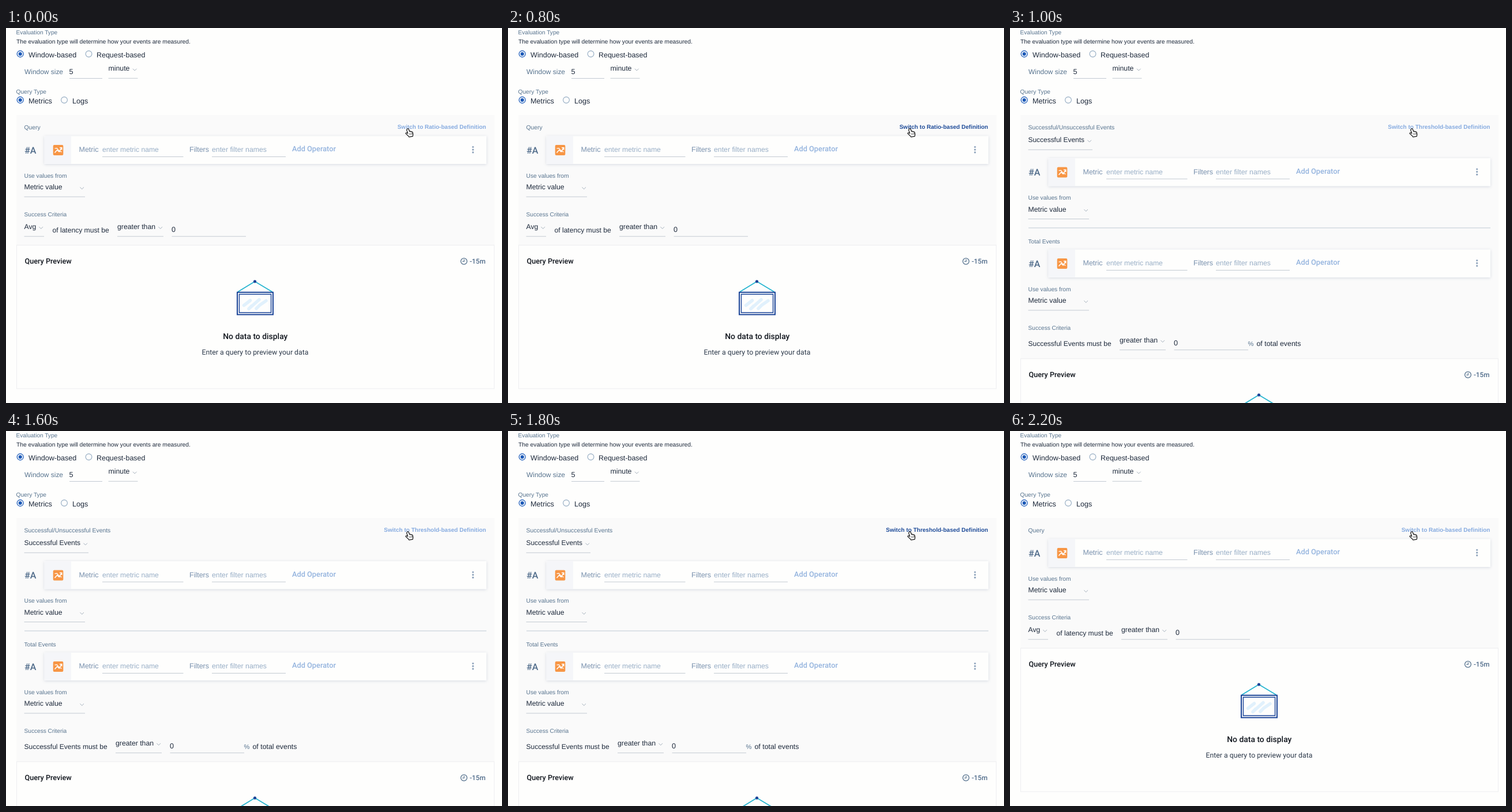
An HTML page for the animation above (2400 ms loop, 860 by 651 pixels).

```html
<!DOCTYPE html>
<html lang="en">
<head>
<meta charset="utf-8">
<style>
html, body { margin: 0; width: 100%; height: 100%; overflow: hidden; background: #fefefd; }
svg { display: block; width: 860px; height: 651px; }
text { font-family: "Liberation Sans", Arial, sans-serif; fill: #1e2a3c; text-rendering: geometricPrecision; white-space: pre; }
.label { fill: #58748f; }
.hint { fill: #98aec6; }
.field { fill: #7890ad; }
.bold { font-family: Roboto, sans-serif; font-weight: 500; }
.plain { font-family: Roboto, sans-serif; fill: #2c394a; }
.black { fill: #10151d; }
.slate { fill: #4f6b8a; }
.add { fill: #93b3de; }
.link { font-weight: bold; text-anchor: end; }
.mid { text-anchor: middle; }
.end { text-anchor: end; }
.card { fill: #fefefd; filter: drop-shadow(0 1px 2.5px rgba(70, 90, 130, .2)); }
.line { fill: none; stroke: #c3cad2; }
.chev { fill: none; stroke: #a3afbb; }
</style>
</head>
<body>
<svg id="stage" viewBox="0 0 860 651"></svg>
<script>
const LOOP = 2400;
const LIGHT = '#86abe0', DARK = '#1f4c99';

const text = (x, y, size, str, cls = '') =>
  `<text x="${x}" y="${y}" font-size="${size}" class="${cls}">${str}</text>`;
const rect = (x, y, w, h, attrs) =>
  `<rect x="${x}" y="${y}" width="${w}" height="${h}" ${attrs}/>`;
const path = (d, attrs) => `<path d="${d}" ${attrs}/>`;
const circle = (x, y, r, attrs) => `<circle cx="${x}" cy="${y}" r="${r}" ${attrs}/>`;
const rule = (x1, x2, y) => path(`M${x1} ${y}H${x2}`, 'class="line"');
const chevron = (x, y) => path(`M${x - 3.3} ${y - 1.6}l3.3 3.3 3.3-3.3`, 'class="chev"');
const shift = (dy, body) => `<g transform="translate(0 ${dy})">${body}</g>`;

const radio = (x, y, on) => on
  ? circle(x, y, 5.5, 'fill="#fefefd" stroke="#2461bd" stroke-width="1.3"') + circle(x, y, 3.1, 'fill="#1d5ab8"')
  : circle(x, y, 5.4, 'fill="#fefefd" stroke="#91a9c0" stroke-width="1.1"');

const select = (x, y, size, str, right) =>
  text(x, y, size, str) + chevron(right - 5.3, y - 2) + rule(x, right, y + 13);

const header =
  text(17.5, 10.7, 10.1, 'Evaluation Type', 'label') +
  text(18, 26.5, 10.27, 'The evaluation type will determine how your events are measured.') +
  radio(24.7, 45, true) + text(39, 51, 12.6, 'Window-based') +
  radio(143.5, 45) + text(157, 51, 12.45, 'Request-based') +
  text(32, 80, 11.95, 'Window size', 'label') +
  text(109.5, 79.7, 12.6, '5') + rule(110, 167, 87.5) +
  select(177.5, 74.3, 12.3, 'minute', 228.5) +
  text(17.5, 114, 10.2, 'Query Type', 'label') +
  radio(24.7, 125, true) + text(39, 131.3, 12.7, 'Metrics') +
  radio(101, 125) + text(115, 131.3, 12.6, 'Logs');

const queryRow =
  text(32, 217.5, 16, '#A', 'bold slate') +
  rect(66.5, 187.5, 766.5, 48.5, 'class="card"') +
  rect(67, 188, 46, 47.5, 'fill="#f5f6f9"') +
  rect(81.7, 203, 17.6, 18, 'rx="2" fill="#f79645"') +
  path('M84.5 216.5l4.2-4.7 3.4 3 4.4-6.8M93 207.7h3.7v3.7', 'fill="none" stroke="#fff" stroke-width="1.6"') +
  path('M84.5 209.2l3.8-.6 4 5 4.2 1.6', 'fill="none" stroke="#fff" stroke-width="1.3"') +
  text(126.5, 215, 12.5, 'Metric', 'field') +
  text(167, 215, 12.15, 'enter metric name', 'hint') + rule(167, 307.5, 223.5) +
  text(318, 215, 12.5, 'Filters', 'field') +
  text(357, 215, 12.3, 'enter filter names', 'hint') + rule(357, 485, 223.5) +
  text(496, 214, 12.75, 'Add Operator', 'bold add') +
  [206.5, 211.2, 215.9].map(y => circle(809.7, y, 1.6, 'fill="#8ea3bb"')).join('') +
  text(31.5, 259.8, 10.25, 'Use values from', 'label') +
  select(31.5, 280, 12.25, 'Metric value', 137);

const criteria = (x, lead) =>
  text(31.5, 326.8, 10.15, 'Success Criteria', 'label') + lead +
  select(x, 348.8, 12.25, 'greater than', x + 80) +
  text(x + 94, 354.2, 12.6, '0') + rule(x + 94.5, x + 223, 361.8);

const preview =
  rect(18.5, 377, 828, 249, 'fill="#fefefd" stroke="#edeef0"') +
  text(32.5, 409.3, 12.65, 'Query Preview', 'bold black') +
  circle(794, 405, 5.4, 'fill="none" stroke="#58748f" stroke-width="1.3"') +
  path('M794.3 401.5v4h-3', 'fill="none" stroke="#58748f" stroke-width="1.2"') +
  text(831.5, 408.7, 11.8, '-15m', 'bold slate end') +
  path('M402 458l29.5-18 30 18', 'fill="none" stroke="#27b5d0" stroke-width="1.8"') +
  circle(431.5, 440, 2.6, 'fill="#1c4598"') +
  rect(401, 458.8, 62, 38.7, 'fill="#fefefd" stroke="#1c4598" stroke-width="2"') +
  rect(404.4, 462.2, 55.2, 31.9, 'fill="#fefefd" stroke="#1c4598" stroke-width="1.5"') +
  path('M412.5 481.5l11-8.5M421 487.5l5-5M421 487.5l18-16M434 487l6-6M440 481l11-7.5', 'fill="none" stroke="#e1f1fc" stroke-width="5.5" stroke-linecap="round"') +
  text(432.3, 540.3, 13.9, 'No data to display', 'bold black mid') +
  text(432, 566.7, 12.3, 'Enter a query to preview your data', 'plain mid');

const panel = height => rect(18, 151, 829, height, 'fill="#fafafa"');
const link = (id, str) => `<g id="${id}">${text(832.5, 175.2, 10.04, str, 'link')}</g>`;

const threshold = panel(226) +
  text(31.5, 176, 10.3, 'Query', 'label') +
  link('toRatio', 'Switch to Ratio-based Definition') +
  queryRow +
  criteria(193, select(31.5, 348.8, 12.2, 'Avg', 66) + text(80.5, 355, 12.1, 'of latency must be')) +
  preview;

const ratio = panel(423) +
  text(31.5, 176, 10.42, 'Successful/Unsuccessful Events', 'label') +
  link('toThreshold', 'Switch to Threshold-based Definition') +
  select(31.5, 198.3, 11.95, 'Successful Events', 143) +
  shift(38.5, queryRow) +
  path('M32 347H833', 'stroke="#bfcbd6" stroke-width="1.2"') +
  text(31.5, 373.5, 10.15, 'Total Events', 'label') +
  shift(197, queryRow + criteria(190,
    text(31.5, 355, 12, 'Successful Events must be') +
    text(412.5, 355, 11.2, '%', 'label') +
    text(427.5, 355, 12.35, 'of total events')) + preview);

const hand = shift(-1, path('M696 176.2q1.6-1.2 2.3.6l1.2 3.7q1.1-.8 1.9.4 1.2-.7 1.9.5 1.4-.5 1.9 1l.5 2.6q.2 1.6-.6 4.2l-6.3 1q-1-2-3-3.4l-2.6-2.4q-.5-1.7 1.5-1.4l2 1-2-6q-.1-1.1 1.3-1.8z',
  'fill="#fff" stroke="#141414" stroke-width="1.2" stroke-linejoin="round"') +
  path('M699.6 183.5l.9 3.2M702 183.3l.7 3M704 183l.5 2.8', 'stroke="#141414" stroke-width=".7"'));

stage.innerHTML = header + `<g id="thresholdView">${threshold}</g><g id="ratioView">${ratio}</g>` + hand;

const byId = id => document.getElementById(id);
const toRatio = byId('toRatio').firstChild, toThreshold = byId('toThreshold').firstChild;
const views = [byId('thresholdView'), byId('ratioView')];

function draw(now) {
  const t = now % LOOP;
  const isRatio = t >= 1000 && t < 2000;
  views[0].style.display = isRatio ? 'none' : '';
  views[1].style.display = isRatio ? '' : 'none';
  toRatio.style.fill = t >= 400 && t < 1000 ? DARK : LIGHT;
  toThreshold.style.fill = t >= 1800 ? DARK : LIGHT;
}

const start = performance.now();
function tick() {
  draw(performance.now() - start);
  requestAnimationFrame(tick);
}
tick();
</script>
</body>
</html>
```
